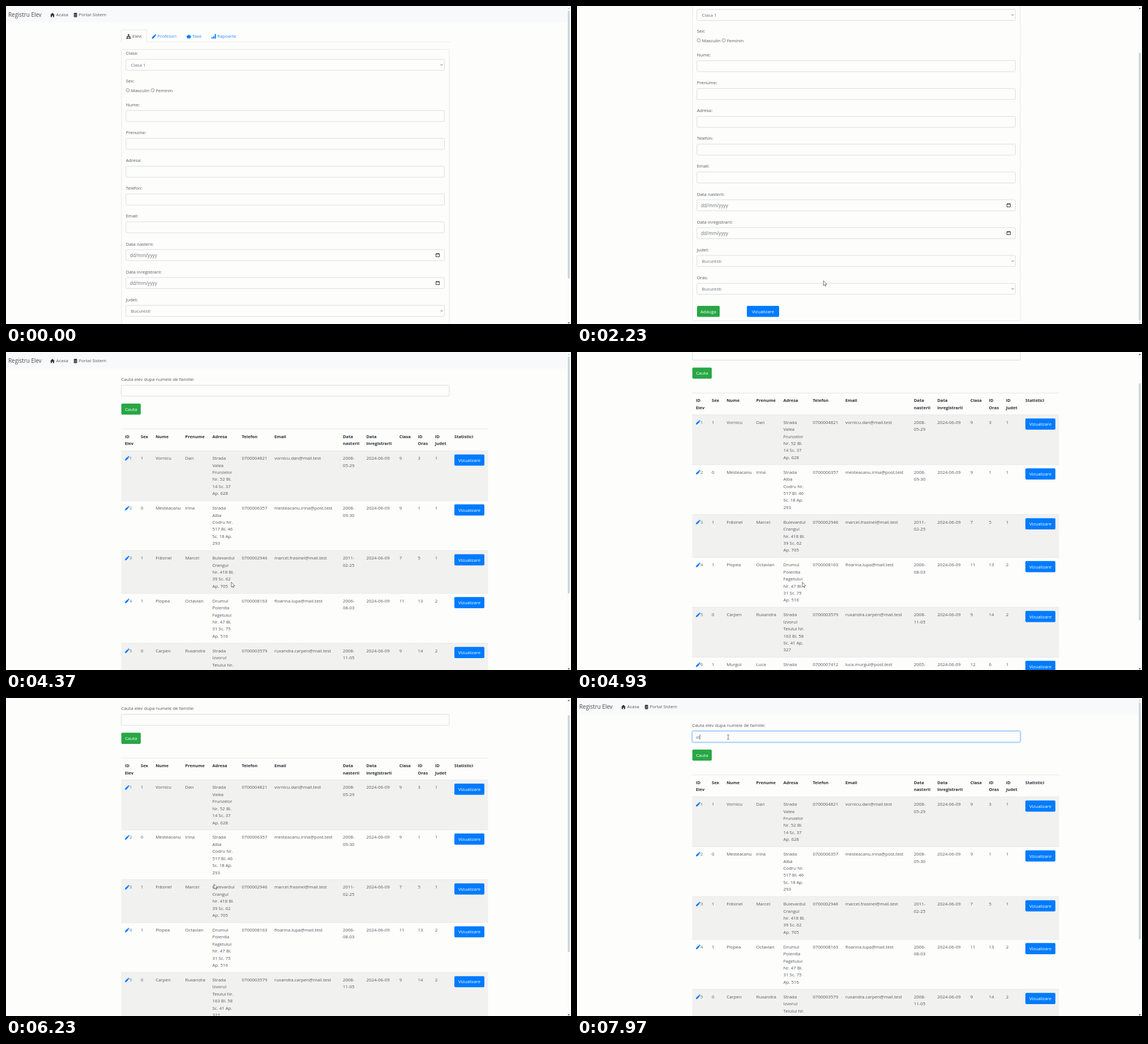
An HTML page for the animation above (8 s loop, 998 by 561 pixels).

```html
<!DOCTYPE html>
<html lang="ro">
<head>
<meta charset="utf-8">
<title>Registru Elev</title>
<style>
  html, body { margin: 0; width: 100%; height: 100%; overflow: hidden; background: #fdfdfc; }
  svg { display: block; width: 100%; height: 100%; }
  text { font: 7.9px "Open Sans", "Noto Sans", sans-serif; fill: #55595d; white-space: pre; }
  .brand { font-size: 9.9px; fill: #484c50; }
  .head { font-size: 7.6px; font-weight: 700; fill: #2b2f33; }
  .link { fill: #2a8cff; }
  .button { fill: #fff; text-anchor: middle; }
  .date { font-size: 8.2px; fill: #6c7177; }
  .value { fill: #6c7177; }
  .status { font-size: 5.9px; fill: #777; }
  .field { fill: #fdfdfc; stroke: #dadde0; }
  .line { fill: none; stroke: #e6e8ea; }
</style>
</head>
<body>
<svg id="stage" viewBox="0 0 998 561" preserveAspectRatio="none">
  <defs>
    <path id="home" d="M0 4.3 4 .6 8 4.3H7V8H4.8V5.5H3.2V8H1V4.3Z"/>
    <path id="database" d="M.5 1.5C.5-.2 6.5-.2 6.5 1.5V6.8C6.5 8.5.5 8.5.5 6.8ZM.5 2.2Q3.5 3.9 6.5 2.2V2.7Q3.5 4.4.5 2.7ZM.5 4.8Q3.5 6.5 6.5 4.8V5.3Q3.5 7 .5 5.3Z" fill-rule="evenodd"/>
    <path id="pencil" d="M0 8 .5 5.5 4.7 1.3 6.7 3.3 2.5 7.5ZM5.2.8 6 0Q6.4-.2 6.8.2L7.8 1.2Q8.2 1.6 7.8 2L7.2 2.8Z"/>
    <g id="people">
      <circle cx="4.2" cy="1.4" r="1.4"/><path d="M2.4 4.8V3.5Q4.2 2.4 6 3.5V4.8Z"/>
      <circle cx="2" cy="5" r="1.2"/><circle cx="6.4" cy="5" r="1.2"/>
      <path d="M0 8.2V7Q2 5.8 4 7V8.2ZM4.4 8.2V7Q6.4 5.8 8.4 7V8.2Z"/>
    </g>
    <path id="pig" d="M1.2 3.4Q2.4 1.5 5.6 2L7.2 1.2V2.7L8.5 4V5.6L7.2 6V7.7H5.6V6.7H3.5V7.7H1.9V6.3Q.7 5.3 1 4Q-.1 4 0 2.8Q.2 3.5 1.2 3.4ZM3 1.2Q4.2-.2 5.5 1.1L5.3 1.5Q4 1.2 3 1.7Z"/>
    <path id="bars" d="M0 5.6H1.9V8H0ZM2.8 3.7H4.7V8H2.8ZM5.6 0H7.7V8H5.6Z"/>
    <path id="chevron" d="M0 0 2 2 4 0" fill="none" stroke="#555" stroke-width=".9"/>
    <path id="calendar" d="M.5 1.2H6.5V6.5H.5ZM.5 1.7H6.5M2 .1V1M5 .1V1" fill="none" stroke="#222" stroke-width=".9"/>
  </defs>
  <g id="formPage"></g>
  <g id="tablePage"></g>
  <g id="scrollbar">
    <rect x="990" width="8" height="561" fill="#fcfcfc"/>
    <rect id="thumb" x="992.4" width="3.3" rx="1.5" fill="#c7d3d9"/>
    <path id="upArrow" d="M992 5.2 994 3 996 5.2Z"/>
    <path id="downArrow" d="M992 558 994 560.3 996 558Z"/>
  </g>
  <g id="status">
    <path d="M874.5 562V551Q874.5 549.5 876 549.5H999V562Z" fill="#f1f2f3" stroke="#cfd1d3"/>
    <text class="status" x="879" y="559">localhost/index.php/pagini/tabel_elevi_</text>
  </g>
  <g id="cursor">
    <path id="arrow" d="M0 0V8.8L2 7 3.3 9.8 4.6 9.2 3.4 6.5H6.1Z" fill="#fff" stroke="#555" stroke-width=".8"/>
    <path id="hand" d="M-.9 7V.8Q0-.5.9.8V4.2L2.1 4.4 3.3 4.8 4.5 5.2Q5.5 5.5 5.4 6.8L4.4 11.5H-.8L-3.8 7.5Q-3.6 6.2-2.4 6.4Z" fill="#fff" stroke="#444" stroke-width=".8"/>
    <path id="beam" d="M-2-4H-.5L0-3.5.5-4H2M0-3.5V3.5M-2 4H-.5L0 3.5.5 4H2" fill="none" stroke="#555" stroke-width=".8"/>
  </g>
</svg>
<script>
const LOOP = 8000;
const $ = id => document.getElementById(id);

const text = (x, y, s, cls = '') => `<text x="${x}" y="${y}" class="${cls}">${s}</text>`;
const icon = (name, x, y, fill = '#33373b') => `<use href="#${name}" x="${x}" y="${y}" fill="${fill}"/>`;
const field = (x, y, w, extra = '') => `<rect class="field" x="${x}" y="${y}" width="${w}" height="19.4" rx="2" ${extra}/>`;
const line = d => `<path class="line" d="${d}"/>`;
const button = (x, y, w, label, fill) =>
  `<rect x="${x}" y="${y}" width="${w}" height="19.6" rx="2" fill="${fill}"/>` + text(x + w / 2, y + 12.8, label, 'button');

const navbar = '<rect width="990" height="29" fill="#f8f9fa"/>' +
  text(4, 18.6, 'Registru Elev', 'brand') +
  icon('home', 78, 11.5) + text(88.5, 17.8, 'Acasa') +
  icon('database', 119.2, 11.7) + text(128.5, 17.8, 'Portal Sistem');

function buildForm() {
  const plain = y => field(211.8, y, 562.6);
  const select = (y, label) => plain(y) + text(220.5, y + 13, label, 'value') + icon('chevron', 767.5, y + 8.8, 'none');
  const date = y => plain(y) + text(219, y + 13, 'dd/mm/yyyy', 'date') + icon('calendar', 759, y + 6, 'none');
  const radio = (x, label) => `<circle cx="${x}" cy="148.6" r="2.9" fill="#fff" stroke="#666" stroke-width=".7"/>` + text(x + 5.8, 151.8, label);

  let out = navbar +
    line('M203.5 63.5V44Q203.5 42 205.5 42H246.5Q248.5 42 248.5 44V63.5H783') +
    icon('people', 212.3, 49.6) + text(223, 55.9, 'Elevi') +
    icon('pencil', 257.5, 49.8, '#007bff') + text(267.5, 55.9, 'Profesori', 'link') +
    icon('pig', 318.3, 49.7, '#007bff') + text(329, 55.9, 'Taxe', 'link') +
    icon('bars', 363, 49.5, '#007bff') + text(373, 55.9, 'Rapoarte', 'link') +
    '<rect class="line" x="204" y="76.5" width="579" height="567" rx="2"/>' +
    text(211.7, 86, 'Clasa:') + select(94, 'Clasa 1') +
    text(211.7, 135, 'Sex:') + radio(215, 'Masculin') + radio(259, 'Feminin');

  const rows = [['Nume:', plain], ['Prenume:', plain], ['Adresa:', plain], ['Telefon:', plain], ['Email:', plain],
    ['Data nasterii:', date], ['Data inregistrarii:', date],
    ['Judet:', y => select(y, 'Bucuresti')], ['Oras:', y => select(y, 'Bucuresti')]];
  rows.forEach(([label, control], i) => {
    const y = 177 + 49.1 * i;
    out += text(211.7, y, label) + control(y + 7.4);
  });
  return out + button(212, 617, 40, 'Adauga', '#28a745') + button(300, 617, 57, 'Vizualizare', '#007bff');
}

const columns = [210, 238, 264.2, 316.5, 364.5, 416.5, 474, 595, 636.5, 694.8, 727.5, 757.8, 792];
const headers = ['ID|Elev', 'Sex', 'Nume', 'Prenume', 'Adresa', 'Telefon', 'Email', 'Data|nasterii',
  'Data|inregistrarii', 'Clasa', 'ID|Oras', 'ID|Judet', 'Statistici'];
const pupils = [
  '1;Vornicu;Dan;Strada|Valea|Frunzelor|Nr. 52 Bl.|14 Sc. 37|Ap. 628;0700004821;vornicu.dan@mail.test;2008-|05-29;9;3;1',
  '0;Mesteacanu;Irina;Strada|Alba|Codru Nr.|517 Bl. 46|Sc. 18 Ap.|293;0700006357;mesteacanu.irina@post.test;2008-|09-30;9;1;1',
  '1;Frăsinel;Marcel;Bulevardul|Crangul|Nr. 418 Bl.|39 Sc. 62|Ap. 705;0700002946;marcel.frasinel@mail.test;2011-|02-25;7;5;1',
  '1;Plopea;Octavian;Drumul|Poienita|Fagetului|Nr. 47 Bl.|31 Sc. 75|Ap. 516;0700008163;floarina.lupa@mail.test;2006-|08-03;11;13;2',
  '0;Carpen;Ruxandra;Strada|Izvorul|Teiului Nr.|163 Bl. 58|Sc. 41 Ap.|327;0700003579;ruxandra.carpen@mail.test;2008-|11-05;9;14;2',
  '1;Murgul;Luca;Strada|Rouă Nr.|76 Bl. 29|Sc. 53 Ap.|184;0700007412;luca.murgul@post.test;2005-|02-16;12;6;1',
  '1;Pin;Horatiu;Drumul|Nuca Nr.|41;0700005238;horatiu.pin@mail.test;2006-|06-22;11;12;2'
];

function buildTable() {
  const cell = (x, y, s, cls) => s.split('|').map((part, i) => text(x, y + 12.45 * i, part, cls)).join('');
  let out = navbar + text(203.5, 51, 'Cauta elev dupa numele de familie:') +
    field(203.5, 58.5, 579.5, 'id="search"') + '<text id="query" class="value" x="210" y="71.7"></text>' +
    '<path id="caret" d="M0 64.5V73" stroke="#333" stroke-width=".8"/>' +
    button(203.7, 91, 34.3, 'Cauta', '#28a745') +
    line('M203.5 135.8H851.5') +
    headers.map((h, i) => cell(columns[i], 151.8, h, 'head')).join('');

  let top = 174.3;
  pupils.forEach((row, i) => {
    const [sex, name, first, address, phone, mail, born, grade, town, county] = row.split(';');
    const height = 13.3 + 12.45 * address.split('|').length;
    const values = [sex, name, first, address, phone, mail, born, '2024-06-09', grade, town, county];
    if (i % 2 === 0) out += `<rect x="203.5" y="${top}" width="648" height="${height}" fill="#f1f1f0"/>`;
    out += line(`M203.5 ${top}H851.5`) + icon('pencil', 210, top + 9.3, '#007bff') + text(218, top + 15.8, i + 1, 'value') +
      values.map((v, k) => cell(columns[k + 1], top + 15.8, v)).join('') +
      button(792, top + 6.5, 53, 'Vizualizare', '#007bff');
    top += height;
  });
  return out;
}

$('formPage').innerHTML = buildForm();
$('tablePage').innerHTML = buildTable();

// Timelines: [time, value, ...]
const PAGE_CHANGE = 2950;
const formScroll = [[1420, 0], [1470, 19], [1560, 52], [1650, 74], [1780, 88]];
const tableScroll = [[4840, 0], [4930, 63], [5050, 122], [5240, 173], [5980, 173], [6070, 112], [6180, 45], [6330, 0]];
const pointer = [[300, 1004, 400], [900, 849, 286], [1700, 849, 286], [2450, 328, 536], [3380, 328, 536],
  [4300, 398, 406], [5000, 398, 406], [5400, 401, 400], [5870, 401, 400], [6500, 346, 282], [6750, 346, 282], [7400, 267, 69]];
const shapes = [[0, 'arrow'], [2400, 'hand'], [3400, 'arrow'], [5300, 'beam'], [5960, 'arrow'], [7380, 'beam']];
const typing = [[0, ''], [7740, 's'], [7890, 'st']];
const FOCUS = 7560;

const step = (keys, t) => keys.filter(k => k[0] <= t).pop()[1];
const smooth = u => u * u * (3 - 2 * u);
function tween(keys, t, ease = u => u) {
  const next = keys.findIndex(k => k[0] > t);
  if (next === 0) return keys[0].slice(1);
  if (next < 0) return keys[keys.length - 1].slice(1);
  const a = keys[next - 1], b = keys[next];
  const u = ease((t - a[0]) / (b[0] - a[0]));
  return a.slice(1).map((v, i) => v + (b[i + 1] - v) * u);
}
const show = (id, on) => $(id).setAttribute('visibility', on ? 'visible' : 'hidden');
const set = (id, attrs) => { for (const k in attrs) $(id).setAttribute(k, attrs[k]); };

function draw(t) {
  const onTable = t >= PAGE_CHANGE;
  const [scroll] = tween(onTable ? tableScroll : formScroll, t);
  const range = onTable ? 173 : 88;
  const page = onTable ? 'tablePage' : 'formPage';
  $('formPage').style.display = onTable ? 'none' : '';
  $('tablePage').style.display = onTable ? '' : 'none';
  set(page, { transform: `translate(0 ${-scroll})` });

  const length = 547 * 561 / (561 + range);
  set('thumb', { y: 8 + (547 - length) * scroll / range, height: length });
  set('upArrow', { fill: scroll > 0 ? '#444' : '#bbb' });
  set('downArrow', { fill: scroll < range ? '#444' : '#bbb' });

  const focused = t >= FOCUS;
  const query = step(typing, t);
  $('search').style.cssText = focused ? 'stroke:#80bdff;filter:drop-shadow(0 0 1px #80bdff)' : '';
  $('query').textContent = query;
  set('caret', { transform: `translate(${210.4 + query.length * 3.3} 0)` });
  show('caret', focused);

  show('status', t >= 2450 && t < 3400);
  const [x, y] = tween(pointer, t, smooth);
  const shape = step(shapes, t);
  set('cursor', { transform: `translate(${x} ${y})` });
  for (const id of ['arrow', 'hand', 'beam']) show(id, id === shape);
}

const start = performance.now();
function frame() {
  draw((performance.now() - start) % LOOP);
  requestAnimationFrame(frame);
}
frame();
</script>
</body>
</html>
```
